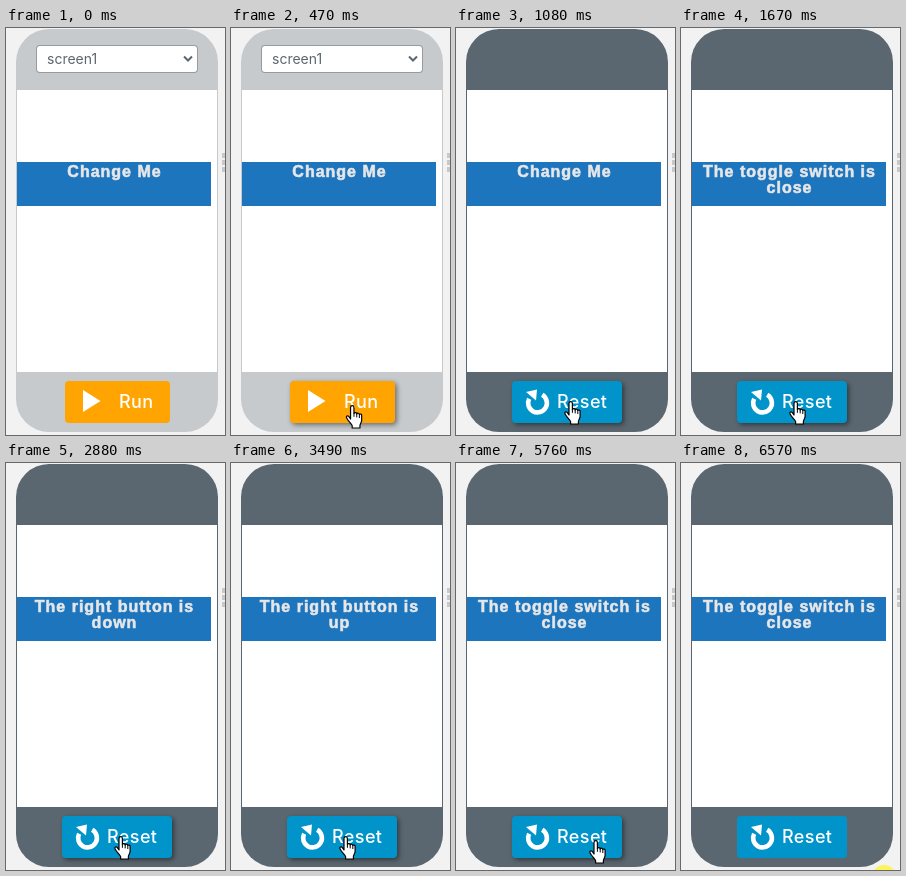
Animation of 219 by 407 pixels, one loop 6.79 s. Source, as an HTML page with a canvas:

```html
<!DOCTYPE html>
<html lang="en">
<head>
<meta charset="utf-8">
<title>Phone preview</title>
<style>
html, body { margin: 0; width: 100%; height: 100%; overflow: hidden; background: #f2f2f2; }
canvas { display: block; width: 219px; height: 407px; }
</style>
</head>
<body>
<canvas id="stage"></canvas>
<script>
const W = 219, H = 407, LOOP = 6790, STEP = 70;
const RUN_AT = 1080;
const canvas = document.getElementById('stage');
const ratio = window.devicePixelRatio || 1;
canvas.width = W * ratio;
canvas.height = H * ratio;
const ctx = canvas.getContext('2d');

const labels = [
  [0, 'Change Me'],
  [1340, 'The left button is', 'down'],
  [1670, 'The toggle switch is', 'close'],
  [2880, 'The right button is', 'down'],
  [3490, 'The right button is', 'up'],
  [4220, 'The toggle switch is', 'open'],
  [5030, 'The toggle switch is', 'close']
];

const hand = new Path2D('M5 14V2.4a1.7 1.7 0 0 1 3.4 0V8.4a1.5 1.5 0 0 1 2.8.5' +
  'a1.4 1.4 0 0 1 2.6.6a1.3 1.3 0 0 1 2.3 1V15.5c0 2-1.7 3.3-1.7 5V23H6.6V20.5' +
  'C5 18 2.2 15.5 1 12.8C.3 11.2 2 10.2 3.2 11.4Z');

function rect(x, y, w, h, color) {
  ctx.fillStyle = color;
  ctx.fillRect(x, y, w, h);
}

function roundRect(x, y, w, h, r, color) {
  ctx.beginPath();
  ctx.roundRect(x, y, w, h, r);
  ctx.fillStyle = color;
  ctx.fill();
}

function polygon(points, color) {
  ctx.beginPath();
  points.forEach(([x, y]) => ctx.lineTo(x, y));
  ctx.closePath();
  ctx.fillStyle = color;
  ctx.fill();
}

function text(str, x, y, font, color, spacing, align = 'left') {
  ctx.font = font;
  ctx.fillStyle = color;
  ctx.letterSpacing = spacing + 'px';
  ctx.textAlign = align;
  ctx.fillText(str, x, y);
}

// Top-left corner of the hand, or null while it is off stage.
function cursorAt(t) {
  const mix = (a, b, k) => a + (b - a) * k;
  const easeOut = k => 1 - (1 - k) ** 2;
  if (t < 260 || t >= 6110) return null;
  if (t < 610) {
    const k = easeOut(Math.floor((t - 260) / STEP) / 5);
    return [mix(149, 108, k), mix(398, 373, k)];
  }
  if (t < 5760) return [108, 373];
  const k = easeOut(Math.floor((t - 5760) / STEP) / 5);
  return [mix(133, 188, k), mix(377, 404, k)];
}

function drawPhone(running) {
  const shell = running ? '#5b6770' : '#c6cacd';
  rect(0, 0, W, H, '#f2f2f2');
  for (let i = 0; i < 3; i++) rect(216, 125 + i * 7, 3, 5, '#c8c8c8');
  roundRect(10, 1, 202, 403, 33, shell);
  rect(11, 62, 200, 282, '#fff');
}

function drawSelect() {
  roundRect(30, 17, 162, 28, 4, '#949ca2');
  roundRect(31, 18, 160, 26, 3, '#fff');
  text('screen1', 41, 36, '14px Inter, sans-serif', '#5b6770', 0);
  ctx.beginPath();
  ctx.moveTo(178, 28.5);
  ctx.lineTo(182, 32.5);
  ctx.lineTo(186, 28.5);
  ctx.strokeStyle = '#5b6770';
  ctx.lineWidth = 2;
  ctx.stroke();
}

function drawLabel(t) {
  rect(11, 134, 194, 44, '#1c75bd');
  const [, ...lines] = labels.filter(([start]) => t >= start).pop();
  ctx.strokeStyle = '#e7e7e8';
  ctx.lineWidth = 0.6;
  lines.forEach((line, i) => {
    const y = 149 + i * 16;
    text(line, 108.5, y, 'bold 16px "Liberation Sans", Arial, sans-serif', '#e7e7e8', 1, 'center');
    ctx.strokeText(line, 108.5, y);
  });
}

function drawButton(running, raised) {
  const [x, w, color] = running ? [56, 110, '#0094ca'] : [59, 105, '#ffa400'];
  ctx.save();
  if (raised) {
    ctx.shadowColor = 'rgba(0, 0, 0, 0.45)';
    ctx.shadowBlur = 5 * ratio;
    ctx.shadowOffsetX = ctx.shadowOffsetY = 2 * ratio;
  }
  roundRect(x, 353, w, 42, 4, color);
  ctx.restore();

  const font = '500 18px Inter, sans-serif';
  if (!running) {
    polygon([[77, 362], [94.5, 373], [77, 384]], '#fff');
    text('Run', 113, 380, font, '#fff', 0.4);
    return;
  }
  ctx.beginPath();
  ctx.arc(81.5, 375, 9.4, -Math.PI / 3, Math.PI * 1.15);
  ctx.strokeStyle = '#fff';
  ctx.lineWidth = 4.6;
  ctx.stroke();
  polygon([[70, 364], [81, 361.5], [80, 372.5]], '#fff');
  text('Reset', 101, 380, font, '#fff', 0.4);
}

function drawCursor([x, y]) {
  ctx.save();
  ctx.translate(x, y);
  ctx.fillStyle = '#fff';
  ctx.fill(hand);
  ctx.strokeStyle = '#000';
  ctx.lineWidth = 1.2;
  ctx.lineJoin = 'round';
  ctx.stroke(hand);
  ctx.beginPath();
  for (const [lx, top] of [[8.4, 8.4], [11.2, 9], [13.8, 9.6]]) {
    ctx.moveTo(lx, top);
    ctx.lineTo(lx, top + 3.4);
  }
  ctx.lineWidth = 1;
  ctx.stroke();
  ctx.restore();
}

function draw(t) {
  const running = t >= RUN_AT;
  const cursor = cursorAt(t);
  const pressed = t >= 810 && t < 1010;
  const hovering = cursor && cursor[0] + 6 < 166 && cursor[1] < 395;

  ctx.setTransform(ratio, 0, 0, ratio, 0, 0);
  drawPhone(running);
  if (!running) drawSelect();
  drawLabel(t);
  drawButton(running, hovering && !pressed);
  if (cursor) drawCursor(cursor);
  if (t >= 6570) {
    ctx.beginPath();
    ctx.arc(203, 414.5, 12.5, 0, Math.PI * 2);
    ctx.fillStyle = '#fbf45a';
    ctx.fill();
  }
}

const started = performance.now();
function tick() {
  draw((performance.now() - started) % LOOP);
  requestAnimationFrame(tick);
}
tick();
</script>
</body>
</html>
```
